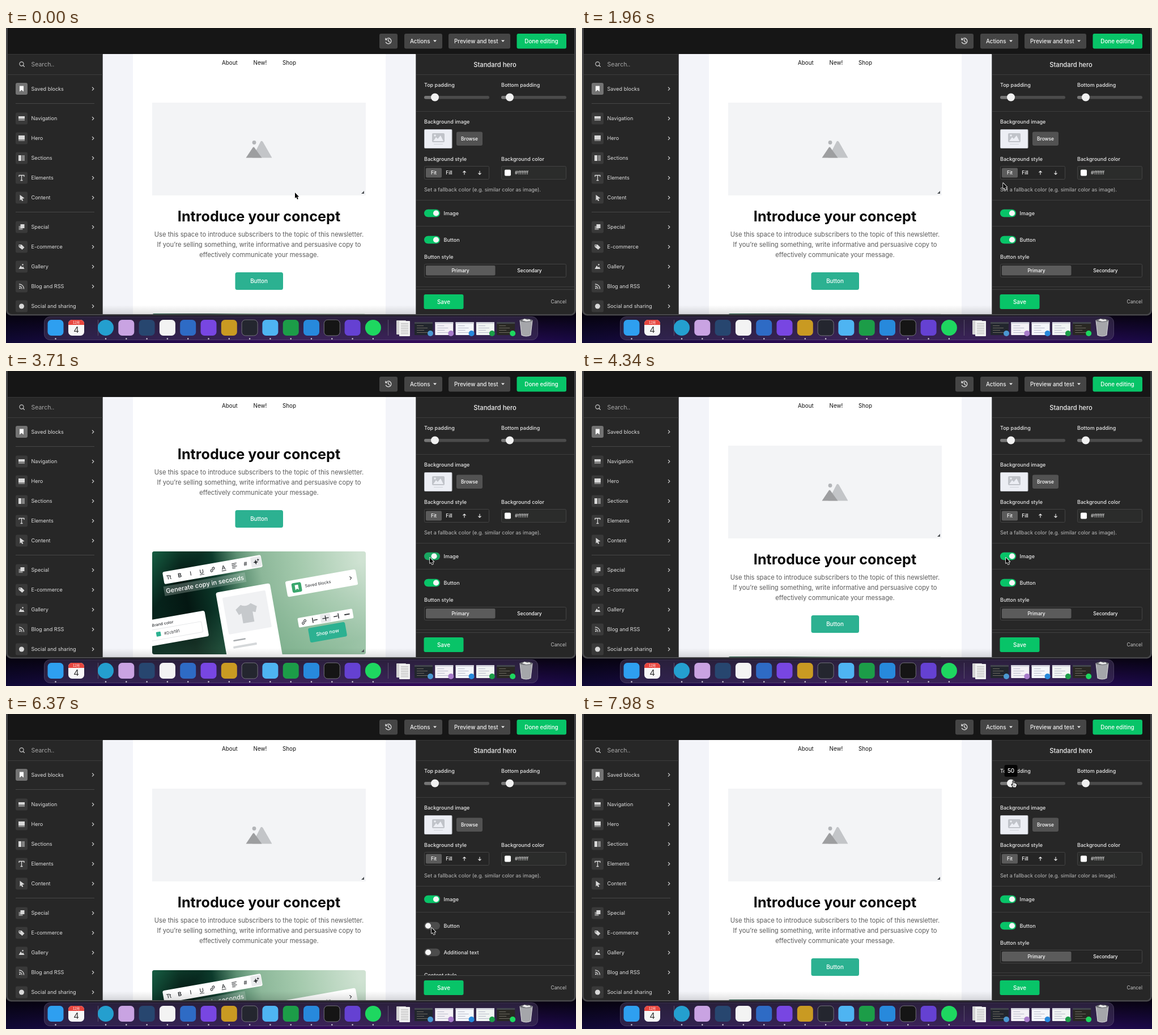
Recreate the animation shown at these times as an HTML page with a canvas. Size 1006x557 px, loop 8000 ms.

```html
<!DOCTYPE html>
<html lang="en">
<head>
<meta charset="utf-8">
<title>Newsletter editor</title>
<style>
html, body { margin: 0; width: 100%; height: 100%; overflow: hidden; background: #161616; }
canvas { display: block; width: 1006px; height: 557px; }
</style>
</head>
<body>
<canvas id="stage" width="1006" height="557"></canvas>
<script>
const ctx = document.getElementById('stage').getContext('2d');
const LOOP = 8000, STEP = 70;
const GREEN = '#08c468', TEAL = '#2cb191', PANEL = '#272727', RULE = '#3d3d3d', LIGHT = '#e8e8e8';

// Drawing helpers
function box(x, y, w, h, fill, r = 0, stroke) {
  ctx.beginPath();
  ctx.roundRect(x, y, w, h, r);
  if (fill) { ctx.fillStyle = fill; ctx.fill(); }
  if (stroke) { ctx.strokeStyle = stroke; ctx.lineWidth = 1; ctx.stroke(); }
}
function dot(x, y, r, fill) {
  ctx.beginPath();
  ctx.arc(x, y, r, 0, Math.PI * 2);
  ctx.fillStyle = fill;
  ctx.fill();
}
function at(x, y, draw, angle = 0) {
  ctx.save();
  ctx.translate(x, y);
  ctx.rotate(angle);
  draw();
  ctx.restore();
}
function shape(x, y, d, fill, stroke, width = 1.1) {
  at(x, y, () => {
    const path = new Path2D(d);
    if (fill) { ctx.fillStyle = fill; ctx.fill(path); }
    if (stroke) {
      ctx.strokeStyle = stroke;
      ctx.lineWidth = width;
      ctx.lineJoin = ctx.lineCap = 'round';
      ctx.stroke(path);
    }
  });
}
function gradient(x0, y0, x1, y1, stops) {
  const g = ctx.createLinearGradient(x0, y0, x1, y1);
  stops.forEach(([k, color]) => g.addColorStop(k, color));
  return g;
}
function text(str, x, y, size, color = LIGHT, weight = 400, align = 'left') {
  ctx.font = `${weight} ${size}px Inter, sans-serif`;
  ctx.textAlign = align;
  ctx.fillStyle = color;
  ctx.fillText(str, x, y + size * 0.364);
}
const label = (str, x, y) => text(str, x, y, 9, LIGHT, 500);
const centered = (str, x, y, size, color = '#fff', weight = 500) => text(str, x, y, size, color, weight, 'center');
const rule = (x, y, w, color = RULE) => box(x, y, w, 1, color);
function clipped(x, y, w, h, draw, r = 0) {
  ctx.save();
  ctx.beginPath();
  ctx.roundRect(x, y, w, h, r);
  ctx.clip();
  draw();
  ctx.restore();
}

// Timeline: [time, ...values]
const cursorKeys = [
  [0, 510, 291], [70, 515, 291], [490, 716, 274], [980, 716, 274], [1050, 720, 273],
  [1400, 775, 230], [1820, 765, 268], [2310, 655, 299], [2660, 655, 299],
  [2800, 661, 298], [3010, 748, 330], [5040, 748, 330], [5250, 752, 368], [5530, 751, 375],
  [6230, 751, 375], [6370, 751, 378], [7140, 751, 378], [7700, 760, 122], [7980, 761, 118]
];
const imageKeys = [[3080, 1], [3220, 0], [3640, 0], [3733, 1]];
const buttonKeys = [[5670, 1], [5810, 0], [6510, 0], [6650, 1]];

function sample(keys, t, ease = k => k) {
  const next = keys.findIndex(key => key[0] > t);
  if (next < 0) return keys[keys.length - 1].slice(1);
  if (next === 0) return keys[0].slice(1);
  const a = keys[next - 1], b = keys[next];
  const k = ease((t - a[0]) / (b[0] - a[0]));
  return a.slice(1).map((v, i) => v + (b[i + 1] - v) * k);
}
const smooth = k => k * k * (3 - 2 * k);
const between = (t, from, to) => t >= from && t < to;

// Small icons, centred on the origin
const ICON = {
  bookmark: 'M-3.5-5H3.5V5L0 2L-3.5 5Z',
  right: 'M-1.2-2.6L1.4 0L-1.2 2.6',
  left: 'M1.2-2.6L-1.4 0L1.2 2.6',
  up: 'M-2.5 1.2L0-1.2L2.5 1.2',
  down: 'M-2.5-1.2L0 1.2L2.5-1.2',
  pencil: 'M-4 4L-3 1L2-4L4-2L-1 3Z',
  eye: 'M-5 0Q0-6.5 5 0Q0 6.5-5 0Z',
  copy: 'M-2-2H4V5H-2ZM-4 2V-5H2',
  bin: 'M-3.5-2H3.5L3 5H-3ZM-4-4H-1.5V-5H1.5V-4H4V-3H-4Z',
  link: 'M-1 1L1-1M-.5-2L1-3.5A1.8 1.8 0 0 1 3.5-1L2 .5M.5 2L-1 3.5A1.8 1.8 0 0 1-3.5 1L-2-.5',
  pointer: 'M-3-5L5 1L1 2L3 5L1 6L-1 3L-3 5Z',
  tag: 'M-5-4H0L5 1L1 5L-5 0Z',
  hill: 'M-5 4L-1.5-2L1 1.5L2.5-.5L5 4Z',
  shirt: 'M-9-15Q0-9 9-15L19-8L15 2L10 0V18H-10V0L-15 2L-19-8Z'
};

function sidebarIcon(kind, x, y) {
  const c = '#d8d8d8', g = '#858585';
  const draw = {
    saved: () => shape(x, y, ICON.bookmark, '#fff'),
    nav: () => { box(x - 5.5, y - 4, 11, 4, c); box(x - 5.5, y, 11, 4, g); },
    hero: () => { box(x - 5.5, y - 5, 11, 7, c); box(x - 5.5, y + 2, 11, 3, g); },
    sections: () => { box(x - 5.5, y - 5, 5, 10, c); box(x + .5, y - 5, 5, 10, g); },
    type: () => shape(x, y, 'M-4.5-2.5V-4.5H4.5V-2.5M0-4.5V4.5M-1.5 4.5H1.5', null, c, 1.3),
    content: () => shape(x, y, ICON.pointer, c),
    special: () => { box(x - 5, y - 2, 7, 7, g); box(x - 2, y - 5, 7, 7, c); },
    shop: () => { shape(x, y, ICON.tag, c); dot(x - 3, y - 2, 1, '#333'); },
    gallery: () => { shape(x, y, ICON.hill, c); dot(x + 2, y - 3.5, 1.2, c); },
    feed: () => { shape(x, y, 'M-4-4A8 8 0 0 1 4 4M-4-.5A4.5 4.5 0 0 1 .5 4', null, c, 1.3); dot(x - 3, y + 3, 1.3, c); },
    social: () => dot(x, y, 4.5, c)
  };
  draw[kind]();
}

function picture(x, y) {
  dot(x - 8.5, y - 12, 3.4, '#b3b5b8');
  shape(x, y, 'M-12 15L3-14Q5-16 7-13L23 15Z', '#c3c5c8');
  shape(x, y, 'M-23 15L-11-3Q-9.5-5-8-3L5 15Z', '#9d9ea0');
}
const grip = (x, y) => shape(x, y, 'M0 0V-5L-5 0Z', '#4d5155');

function drawTopBar() {
  box(3, 0, 1000, 46, '#161616');
  box(659, 10, 32, 26.5, '#454545', 3);
  shape(675, 23, 'M-4.5-2.5A5 5 0 1 1-4.7 2M-5-5V-2H-2M0-3V.5L2.5 2', null, '#eee', 1.2);
  box(703, 10, 67, 26.5, '#454545', 3);
  text('Actions', 713, 23, 9.8, '#f2f2f2', 500);
  box(781, 10, 109, 26.5, '#454545', 3);
  text('Preview and test', 791, 23, 9.8, '#f2f2f2', 500);
  for (const x of [757, 877]) shape(x, 23, 'M-3-1.5H3L0 1.8Z', '#eee');
  box(901.5, 10, 87.5, 26.5, GREEN, 3);
  centered('Done editing', 945, 23, 9.8);
}

function drawSidebar() {
  box(3, 46, 167.5, 460, PANEL);
  rule(3, 46, 167.5, '#383838');
  ctx.beginPath();
  ctx.arc(27.5, 63.5, 3.6, 0, 7);
  ctx.strokeStyle = '#ccc';
  ctx.lineWidth = 1.1;
  ctx.stroke();
  shape(30, 66, 'M0 0L2.5 2.5', null, '#ccc');
  text('Search..', 44.5, 64.5, 10.5, '#a6a6a6');
  rule(3, 82, 167.5);
  const rows = [
    ['Saved blocks', 'saved', 107.5], ['Navigation', 'nav', 160], ['Hero', 'hero', 195],
    ['Sections', 'sections', 230], ['Elements', 'type', 265], ['Content', 'content', 300],
    ['Special', 'special', 352], ['E-commerce', 'shop', 387], ['Gallery', 'gallery', 422],
    ['Blog and RSS', 'feed', 457], ['Social and sharing', 'social', 492]
  ];
  for (const [name, kind, y] of rows) {
    box(17, y - 10.5, 21, 21, kind === 'saved' ? '#737373' : '#393939', 3);
    sidebarIcon(kind, 27.5, y);
    text(name, 44.5, y, 9.1, '#dedede');
    shape(153.5, y, ICON.right, null, '#d5d5d5', 1.1);
  }
  rule(17, 133, 139, '#474747');
  rule(17, 325, 139, '#474747');
}

function drawCardArt(top) {
  const tilt = -Math.PI / 18, ink = '#303336';
  clipped(258, top, 377, 182, () => {
    box(258, top, 377, 182, gradient(268, top + 90, 625, top + 20, [
      [0, '#06231b'], [.14, '#041712'], [.3, '#0c3a2b'], [.42, '#5d9073'],
      [.52, '#8cb799'], [.7, '#a3c9ac'], [1, '#cfe2d2']]));
    box(258, top, 377, 182, gradient(258, top, 310, top + 45, [
      [0, 'rgba(30,120,84,.7)'], [1, 'rgba(30,120,84,0)']]));
    box(258, top, 377, 182, gradient(500, top + 60, 540, top + 182, [
      [0, 'rgba(105,165,125,0)'], [1, 'rgba(105,165,125,.45)']]));

    at(370, top + 73, () => {
      box(0, 0, 97, 200, '#fff', 4);
      box(10, 11, 77, 66, '#f0f1f3', 2);
      shape(48.5, 44, ICON.shirt, '#c6c9cc');
      box(16, 88, 22, 2.5, '#a8acaf', 1);
      box(14, 99, 42, 4, '#d5d8da', 1);
    }, tilt);

    at(364.5, top + 32, () => {
      box(-88, -11, 176, 22, '#fff', 3);
      box(69, -9, 18, 18, '#e9eaec', 2);
      const step = 19.6;
      ['Tt', 'B', 'I', 'U', '', 'A', '', '#'].forEach((c, i) =>
        centered(c, (i - 4) * step, 0, 10, ink, c === 'B' ? 700 : 500));
      rule(-step - 4, 5, 8, ink);
      rule(step - 4, 5, 8, ink);
      shape(0, 0, ICON.link, null, ink);
      shape(2 * step, 0, 'M-4-4H4M-4-1.3H2M-4 1.3H4M-4 4H1', null, ink);
      shape(4 * step, 0, 'M-1-4L.3-.8L3.5 .5L.3 1.8L-1 5L-2.3 1.8L-5.5 .5L-2.3-.8ZM3.5-5.5L4.2-3.7L6-3L4.2-2.3L3.5-.5L2.8-2.3L1-3L2.8-3.7Z', ink);
    }, tilt);

    at(351, top + 58, () => {
      box(-73, -8.5, 146, 17, 'rgba(205,220,210,.28)');
      centered('Generate copy in seconds', 0, 0, 11.2);
    }, tilt);

    at(557, top + 56, () => {
      box(-63, -14, 126, 28, '#fff', 3);
      box(-53, -8.5, 17, 17, '#3aa76d', 3);
      shape(-44.5, 0, 'M-3-4.5H3V4.5L0 2L-3 4.5Z', '#fff');
      text('Saved blocks', -30, 0, 7.4, ink);
      shape(52, 0, ICON.right, null, ink);
    }, tilt);

    at(304, top + 136, () => {
      box(-60, -23, 111, 46, '#fff', 3);
      text('Brand color', -45, -13, 7, ink, 500);
      box(-50, -5, 92, 19, '#fff', 2, '#e2e4e6');
      box(-40, 0, 8, 8, TEAL, 1);
      text('#2cb191', -26, 4.5, 7.2, ink);
    }, tilt);

    at(564, top + 118, () => {
      box(-49, -8.5, 98, 17, '#fff', 2);
      box(-9, -7.5, 18, 15, '#e9eaec', 2);
      shape(-38.5, 0, ICON.link, null, ink);
      shape(-19, 0, 'M-4-4V4M-2 0H4', null, ink, 1.5);
      shape(0, 0, 'M0-4V4M-5 0H5', null, ink, 1.5);
      shape(19, 0, 'M4-4V4M-4 0H2', null, ink, 1.5);
      shape(38.5, 0, 'M-4 0H4', null, ink, 1.8);
    }, tilt);

    at(567.5, top + 143, () => {
      box(-33, -13, 66, 26, TEAL, 3);
      centered('Shop now', 0, 0, 8.6);
    }, tilt);
    grip(632, top + 178);
  }, 4);
}

function drawPage(state) {
  box(170.5, 46, 553, 460, '#f3f4f9');
  box(224, 46, 446, 460, '#fff');
  text('About', 381, 61.5, 9.8, '#111');
  text('New!', 436.5, 61.5, 9.8, '#111');
  text('Shop', 488, 61.5, 9.8, '#111');
  const lift = state.imageShown ? 0 : 186;
  if (state.imageShown) {
    box(258, 132, 377, 164, '#f3f4f6');
    picture(446.5, 214.5);
    grip(632, 293);
  }
  centered('Introduce your concept', 446.5, 333 - lift, 25.2, '#0a0a0a', 700);
  ['Use this space to introduce subscribers to the topic of this newsletter.',
    'If you’re selling something, write informative and persuasive copy to',
    'effectively communicate your message.']
    .forEach((line, i) => centered(line, 446.5, 365 + i * 18.2 - lift, 11.2, '#5b5b5b', 400));
  if (state.buttonShown) {
    box(404.5, 432 - lift, 84.5, 31, TEAL, 3.5);
    centered('Button', 446.5, 447.3 - lift, 9.8);
  }
  drawCardArt(505 - lift - (state.buttonShown ? 0 : 52));
  box(170.5, 490, 553, 16, gradient(0, 490, 0, 506, [[0, 'rgba(0,0,0,0)'], [1, 'rgba(0,0,0,.12)']]));
}

function drawBlockTools() {
  const grey = '#b6bdc3', ink = '#3f454a';
  box(223.5, 96.5, 447, 394.5, null, 0, '#bfc5ca');
  const tools = [[255, 'grid'], [283, 'up'], [311, 'down'], [526, 'bookmark'], [554, 'pencil'],
    [582, 'eye'], [610.5, 'copy'], [638.5, 'bin']];
  for (const [x, kind] of tools) {
    box(x - 10.5, 75, 21, 21.5, grey, [2, 2, 0, 0]);
    if (kind === 'grid') {
      for (let i = 0; i < 6; i++) dot(x - 1.6 + (i % 2) * 3.2, 82.5 + (i >> 1) * 3.2, .9, ink);
    } else if (['up', 'down', 'copy'].includes(kind)) {
      shape(x, 86, ICON[kind], null, ink);
    } else {
      shape(x, 86, ICON[kind], ink);
      if (kind === 'eye') dot(x, 86, 1.5, grey);
    }
  }
  shape(213, 285, 'M0 0L10-5V0Z', '#8d959b');
  shape(681, 285, 'M0 0L-10-5V0Z', '#8d959b');
  box(213, 285, 21, 21, grey, 2);
  box(660, 285, 21, 21, grey, 2);
  shape(223.5, 295.5, ICON.left, null, ink);
  shape(670.5, 295.5, ICON.right, null, ink);
}

function slider(x, value) {
  box(x, 120, 115, 5.5, '#4b4b4b', 3);
  box(x, 120, value, 5.5, '#777', 3);
  dot(x + value, 122.5, 7, '#f1f1f1');
}
function toggle(y, on) {
  box(738, y - 6.7, 28, 13.4, '#4c4c4c', 6.7);
  ctx.globalAlpha = on;
  box(738, y - 6.7, 28, 13.4, GREEN, 6.7);
  ctx.globalAlpha = 1;
  dot(745 + 14 * on, y, 5.1, '#f7f7f7');
}

function drawPanel(state) {
  box(723.5, 46, 279.5, 460, PANEL);
  rule(723.5, 46, 279.5, '#383838');
  centered('Standard hero', 863, 64.5, 11.2, '#f0f0f0');
  rule(724, 82, 279);
  label('Top padding', 738, 101);
  label('Bottom padding', 874, 101);
  slider(738, 19);
  slider(874, 15);
  rule(724, 147, 279);
  label('Background image', 738, 166);
  box(738, 179, 49.5, 34, '#b9bcc2', 2);
  box(739, 180, 47.5, 32, '#eceef4', 1);
  box(752, 186, 22, 16, '#c0c3c9', 2);
  shape(763, 194, 'M-9 6L-4-1L-1 2L4-4L9 6Z', '#eceef4');
  dot(757, 190, 1.7, '#eceef4');
  box(755, 205, 16, 1, '#cfd2d8');
  box(795, 183.5, 46, 24.5, '#525252', 3);
  centered('Browse', 818, 195.7, 8.4);
  label('Background style', 738, 231.5);
  label('Background color', 874, 231.5);
  box(738.5, 244.5, 114, 23, '#252525', 2, '#444');
  box(741, 247.5, 28, 17, '#5b5b5b', 2);
  centered('Fit', 755, 256, 8.4);
  centered('Fill', 782, 256, 8.4);
  shape(809, 256, 'M0 3V-3M-2.3-.8L0-3L2.3-.8', null, '#eee');
  shape(836, 256, 'M0-3V3M-2.3 .8L0 3L2.3 .8', null, '#eee');
  box(874.5, 244.5, 114, 23, '#2b2c2b', 2, '#424242');
  box(880, 250.5, 11, 11, '#fff', 2);
  text('#ffffff', 898, 256, 9.1);
  text('Set a fallback color (e.g. similar color as image).', 738, 286, 9.1, '#bcbcbc');
  rule(724, 304, 279);
  toggle(327.5, state.image);
  label('Image', 772.5, 328);
  rule(724, 350, 279);
  toggle(374.5, state.button);
  label('Button', 772.5, 375);
  if (state.buttonShown) {
    label('Button style', 738, 404.5);
    box(738.5, 417.5, 250, 23, '#252525', 2, '#444');
    box(741, 420, 122.5, 17.5, '#5b5b5b', 2);
    centered('Primary', 802, 428.5, 8.4);
    centered('Secondary', 924, 428.5, 8.4);
    rule(724, 457, 279);
  } else {
    rule(724, 397, 279);
    toggle(421.5, 0);
    label('Additional text', 772.5, 421.5);
    rule(724, 444, 279);
    clipped(724, 450, 279, 12.5, () => label('Content style', 738, 462));
  }
  box(724, 462, 279, 44, PANEL);
  rule(724, 462, 279, '#414141');
  box(737.5, 471, 70, 26, GREEN, 3);
  centered('Save', 772.5, 484, 9.8);
  text('Cancel', 989, 484, 8.4, '#c5c5c5', 400, 'right');
  if (state.tip) {
    box(745.5, 90, 23, 21, '#050505', 3);
    centered('50', 757, 100.5, 9.8);
  }
}

function drawDesk() {
  box(0, 0, 1006, 557, gradient(0, 0, 1006, 0, [
    [0, '#120a3c'], [.25, '#260b55'], [.5, '#3a0d66'], [.75, '#380c66'], [1, '#1d0a50']]));
  box(0, 500, 1006, 57, gradient(0, 506, 0, 557, [[0, 'rgba(4,2,8,.9)'], [1, 'rgba(4,2,8,.1)']]));
  box(0, -10, 1006, 518.5, '#47474a', 9);
}

function drawDock() {
  box(67.5, 510.5, 871, 41, 'rgba(68,56,92,.55)', 10, 'rgba(130,120,150,.4)');
  box(162, 516, 1, 28, '#5a526c');
  box(674, 516, 1, 28, '#5a526c');
  const colors = ['#2e9ff0', '#f7f7f7', '#249fcf', '#c9a3e2', '#27466f', '#f3f3f3', '#2e6bc5', '#7846e2',
    '#c99a22', '#24262f', '#4eb4f2', '#1c9d48', '#2789dc', '#151515', '#6541d2', '#1ed760'];
  colors.forEach((color, i) => {
    const x = i < 2 ? 87.5 + i * 36.5 : 176 + (i - 2) * 36.3;
    if (i === 2 || i === 15) dot(x, 530, 14, color);
    else box(x - 14, 516, 28, 28, color, 6.5, i === 13 || i === 9 ? '#73737a' : undefined);
    if (i !== 1) dot(x, 549.5, 1.2, '#d5d2dc');
  });
  box(110, 516, 28, 9, '#e8463f', [6.5, 6.5, 0, 0]);
  ctx.font = '6px "Noto Sans CJK JP", "Noto Sans CJK", sans-serif';
  ctx.textAlign = 'center';
  ctx.fillStyle = '#fff';
  ctx.fillText('12月', 124, 523);
  centered('4', 124, 534, 15, '#333', 400);

  box(689, 517, 17, 25, '#d2d2d2', 1);
  box(694, 518, 19, 27, '#f0f0f0', 1);
  for (let y = 522; y < 542; y += 3) rule(697, y, 13, '#b4b4b4');
  const thumbs = [['#22262d', '#4b97d1'], ['#f3f0f5', '#a87bca'], ['#f4f6fa', '#2789dc'],
    ['#f0f4f2', '#1c9d48'], ['#292823', '#1ed760']];
  thumbs.forEach(([color, badge], i) => {
    const x = 721 + i * 36.3, dark = i === 0 || i === 4;
    box(x, 520, 32, 23, color, 1);
    box(x, 520, 32, 3, dark ? '#41454c' : '#d4d5de');
    for (let k = 0; k < 4; k++) rule(x + 4, 526 + k * 4, 12 + (k * 7) % 13, dark ? '#6d6a60' : '#b9bbcb');
    dot(x + 28, 540, 5, badge);
  });
  shape(918, 530, 'M-11-13H11L8 13Q0 17-8 13Z', '#a5a6aa', '#d2d2d5');
  ctx.beginPath();
  ctx.ellipse(918, 517, 11, 3, 0, 0, 7);
  ctx.fillStyle = '#6d6e73';
  ctx.fill();
  shape(918, 517, 'M-7 0L-3-3L2-1L6-2L8 1L0 2Z', '#e9e9e9');
}

function drawCursor(x, y, hand) {
  if (hand) {
    shape(x, y, 'M-1 1Q0-1 1 1V4Q4 3 5 5Q7 5 6.5 8L5 12H0L-3 7Q-3 5-1 7Z', '#fff', '#111', 1.1);
    shape(x, y, 'M1 7V9.5M3 7V9.5', null, '#111', .7);
  } else {
    const arrow = 'M0 0V10L2.3 8L4 12L5.8 11.2L4.1 7.4H7.2Z';
    shape(x, y, arrow, null, '#fff', 1.6);
    shape(x, y, arrow, '#000');
  }
}

function render(t) {
  const [x, y] = sample(cursorKeys, t, smooth);
  const hover = t > 0 && x > 213 && x < 681 && y > 97 && y < 491;
  const state = {
    image: sample(imageKeys, t)[0],
    button: sample(buttonKeys, t)[0],
    imageShown: !between(t, 3290, 3850),
    buttonShown: !between(t, 5880, 6720),
    tip: x > 738 && x < 853 && y < 128
  };
  drawDesk();
  clipped(3, -10, 1000, 516, () => {
    drawTopBar();
    drawPage(state);
    if (hover) drawBlockTools();
    drawSidebar();
    drawPanel(state);
  }, 7);
  drawDock();
  drawCursor(x, y, state.tip || (hover && x > 650 && Math.abs(y - 296) < 12));
}

let start;
function tick(now) {
  start ??= now;
  const t = (now - start) % LOOP;
  render(Math.floor(t / STEP) * STEP);
  requestAnimationFrame(tick);
}
requestAnimationFrame(tick);
</script>
</body>
</html>
```
